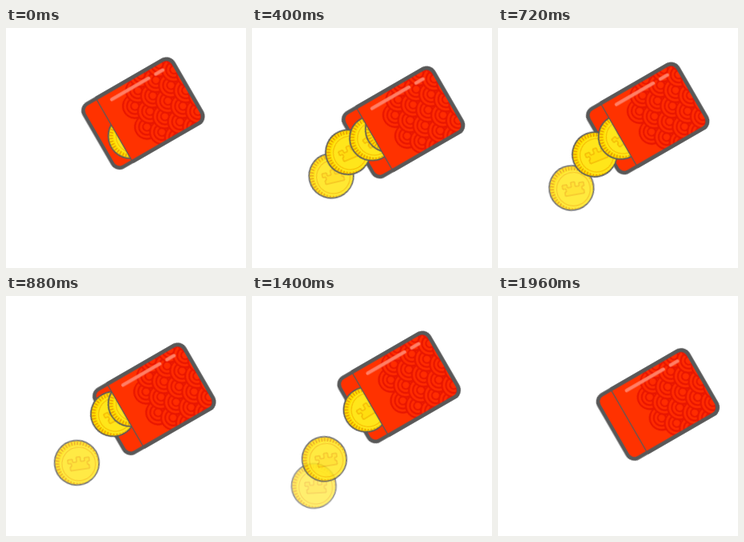
An HTML page without scripts that plays this animation: 300 by 300 pixels, repeating every 2000 ms.

```html
<!DOCTYPE html>
<html lang="en">
<head>
<meta charset="utf-8">
<title>Red envelope with coins</title>
<style>
html, body { margin: 0; width: 100%; height: 100%; overflow: hidden; background: #fff; }
svg { display: block; width: 100vw; height: 100vh; }

.shake { animation: shake 2s ease-in-out infinite; }
.coin {
  opacity: 0;
  offset-path: path("M185 118L156 135Q140 142 125.5 154Q100 175 90 205Q79 230 71 257");
  offset-rotate: -50deg;
  animation: fall 2s linear var(--at) infinite;
}
.wide {
  offset-path: path("M185 118L156 133L144.5 134Q118 156 95 178.5Q74 205 60 250");
  animation-name: wide;
}
.quick { animation-name: quick; }

@keyframes shake {
  0% { transform: translate(171.2px, 106.8px); }
  6% { transform: translate(178px, 100px); }
  12% { transform: translate(169.2px, 105px); }
  20% { transform: translate(189px, 118px); }
  28% { transform: translate(175.7px, 131.3px); }
  36% { transform: translate(187px, 113px); }
  44% { transform: translate(185.2px, 128.8px); }
  50% { transform: translate(199px, 124px); }
  56% { transform: translate(187px, 112px); }
  63% { transform: translate(199px, 128px); }
  70% { transform: translate(183.6px, 114px); }
  78% { transform: translate(198px, 130px); }
  86% { transform: translate(185.7px, 117.8px); }
  98%, 99.99% { transform: translate(199.7px, 135.6px); }
  100% { transform: translate(171.2px, 106.8px); }
}
/* slide out of the pocket, then speed up and fade */
@keyframes fall {
  0% { offset-distance: 0; offset-rotate: -50deg; opacity: 0; }
  1% { opacity: 0; }
  1.01% { opacity: 1; }
  2% { offset-distance: 34px; animation-timing-function: cubic-bezier(.36, 0, .68, .33); }
  18% { opacity: 1; }
  25% { opacity: .82; }
  28% { opacity: .68; }
  30% { offset-distance: 100%; offset-rotate: 0deg; opacity: .12; }
  30.01%, 100% { offset-distance: 100%; offset-rotate: 0deg; opacity: 0; }
}
@keyframes wide {
  0% { offset-distance: 0; offset-rotate: -50deg; opacity: 1; }
  2% { offset-distance: 34px; }
  10% { offset-distance: 45px; }
  18% { opacity: 1; }
  26% { offset-distance: 108px; opacity: .92; }
  33% { offset-distance: 100%; offset-rotate: 0deg; opacity: .12; }
  33.01%, 100% { offset-distance: 100%; offset-rotate: 0deg; opacity: 0; }
}
@keyframes quick {
  0% { offset-distance: 0; offset-rotate: -50deg; opacity: 1; }
  2% { offset-distance: 34px; animation-timing-function: cubic-bezier(.33, 0, .67, .33); }
  15% { opacity: 1; }
  22% { opacity: .7; }
  24.4% { offset-distance: 100%; offset-rotate: 0deg; opacity: .12; }
  24.41%, 100% { offset-distance: 100%; offset-rotate: 0deg; opacity: 0; }
}
</style>
</head>
<body>
<svg viewBox="0 0 300 300">
  <defs>
    <path id="pocket" d="M-41.5 -45.5H54.25a10 10 0 0 1 10 10V35.5a10 10 0 0 1 -10 10H-41.5"/>
    <clipPath id="inside"><use href="#pocket"/></clipPath>

    <g id="scale" fill="#ff2c00" stroke="#e81600" stroke-width="2.2">
      <circle r="15"/>
      <circle r="10"/>
      <circle r="5"/>
    </g>
    <g id="odd">
      <use href="#scale" y="-43"/>
      <use href="#scale" y="-13"/>
      <use href="#scale" y="17"/>
      <use href="#scale" y="47"/>
    </g>
    <g id="even">
      <use href="#scale" y="-28"/>
      <use href="#scale" y="2"/>
      <use href="#scale" y="32"/>
    </g>

    <g id="coin">
      <circle r="27.8" fill="#ffe000" stroke="#5a5a5a" stroke-width="1.8"/>
      <circle r="24.5" fill="none" stroke="#e89a00" stroke-width="5" stroke-dasharray="1.5 2.2"/>
      <circle cx="2.6" cy="2.2" r="23.6" fill="#ffe81c"/>
      <circle cx="2.2" cy="1.8" r="21" fill="#ffe61a" stroke="#f7bc00" stroke-width="1.2"/>
      <path d="M-11 -5h6v4h5v-6h5v6h5v-4h6v5h-3v4h2v5h-24v-5h2v-4h-4z"
            fill="#ffde10" stroke="#efa800" stroke-width="1" stroke-linejoin="round"/>
    </g>
  </defs>

  <g class="shake">
    <rect x="-64.25" y="-45.5" width="128.5" height="91" rx="10" transform="rotate(-30)"
          fill="#ff3200" stroke="#585858" stroke-width="4.6"/>
  </g>

  <g class="coin" style="--at:-40ms"><use href="#coin"/></g>
  <g class="coin wide" style="--at:40ms"><use href="#coin"/></g>
  <g class="coin" style="--at:240ms"><use href="#coin"/></g>
  <g class="coin" style="--at:380ms"><use href="#coin"/></g>
  <g class="coin" style="--at:605ms"><use href="#coin"/></g>
  <g class="coin" style="--at:838ms"><use href="#coin"/></g>
  <g class="coin" style="--at:911ms"><use href="#coin"/></g>
  <g class="coin quick" style="--at:1221ms"><use href="#coin"/></g>

  <g class="shake">
    <g transform="rotate(-30)">
      <use href="#pocket" fill="#ff3200"/>
      <g clip-path="url(#inside)">
        <use href="#scale" x="-4" y="-13"/>
        <use href="#scale" x="-4" y="17"/>
        <use href="#even" x="9"/>
        <use href="#odd" x="22"/>
        <use href="#even" x="35"/>
        <use href="#odd" x="48"/>
        <use href="#even" x="61"/>
        <use href="#odd" x="74"/>
      </g>
      <path d="M-25 -34.6H28M38.5 -34.6H48.5" stroke="#ff7f66" stroke-width="4.4" stroke-linecap="round"/>
      <path d="M-41.5 -45V45" stroke="#585858" stroke-width="1.3"/>
      <use href="#pocket" fill="none" stroke="#585858" stroke-width="4.6"/>
    </g>
  </g>
</svg>
</body>
</html>
```
